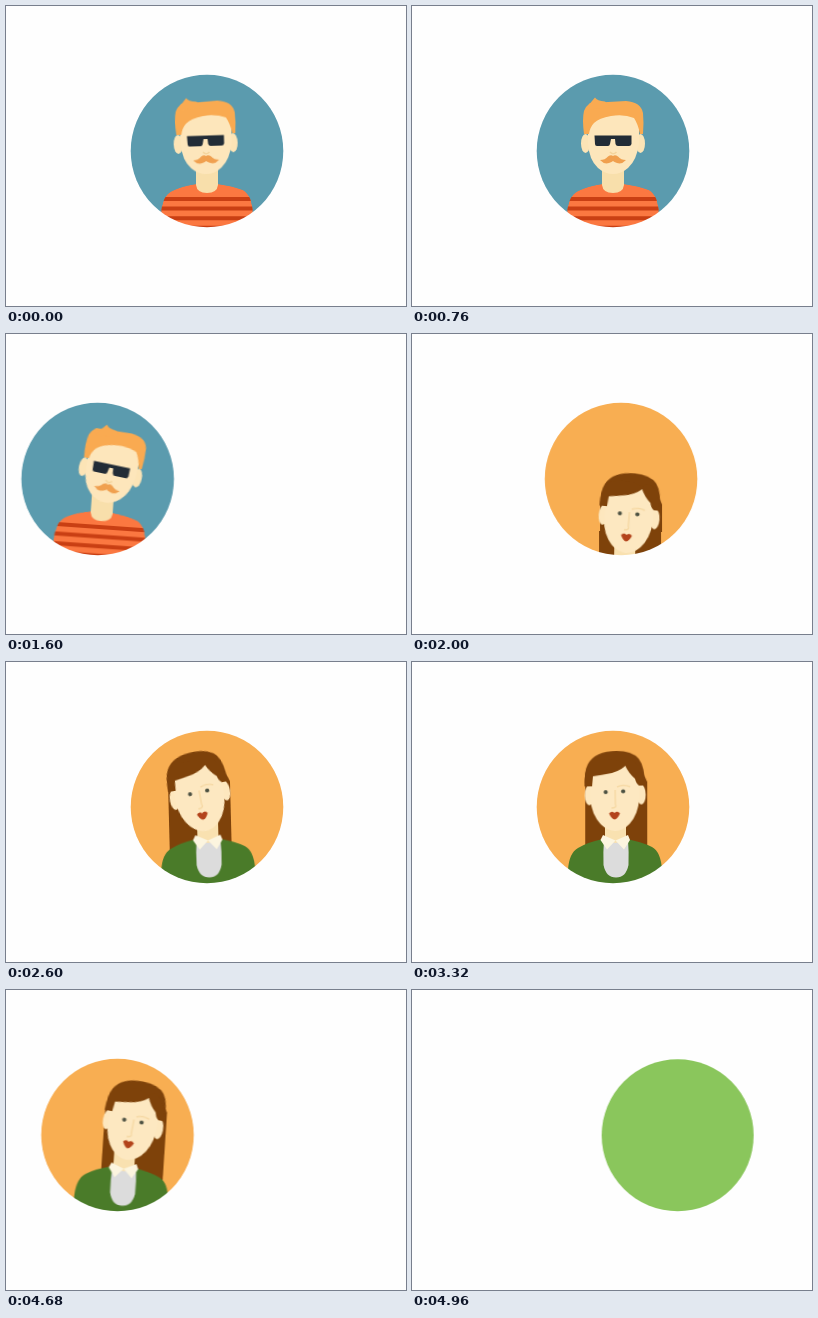
Animation, 400 px wide and 300 px high, one loop 5 s. Source, as an HTML page:

```html
<!DOCTYPE html>
<html lang="en">
<head>
<meta charset="utf-8">
<title>Portrait carousel</title>
<style>
  html, body { margin: 0; width: 100%; height: 100%; overflow: hidden; background: #fefefe; }
  svg { display: block; width: 400px; height: 300px; }
  .disc { clip-path: url(#round); }
  .card, .rise, .body, .head, .locks, .tip { animation: 5s linear infinite; }
  .body { transform-origin: 201px 235px; }
  .head { transform-origin: 202px 180px; }

  #man { animation-name: man-slide; }
  #man .body { animation-name: man-body; }
  #man .head { animation-name: man-head; }
  #man .tip { animation-name: man-tip; }
  #woman { animation-name: woman-slide; }
  #woman .rise { animation-name: woman-rise; }
  #woman .body { animation-name: woman-body; }
  #woman .head { animation-name: woman-head; }
  #woman .locks { animation-name: woman-locks; }
  #next { animation-name: next-slide; }

  /* man: settle, pause, leave to the left with the head trailing */
  @keyframes man-slide {
    0%, 21.6% { transform: translateX(0); animation-timing-function: cubic-bezier(.333, 0, .667, .13); }
    36.8%, 100% { transform: translateX(-288px); }
  }
  @keyframes man-body {
    0%, 21.6% { transform: rotate(0deg); animation-timing-function: cubic-bezier(.5, 0, .75, 1); }
    33%, 100% { transform: rotate(4.2deg); }
  }
  @keyframes man-head {
    0% { transform: rotate(-1.8deg); animation-timing-function: ease-in-out; }
    12%, 21.6% { transform: rotate(0deg); animation-timing-function: cubic-bezier(.5, 0, .75, 1); }
    33%, 100% { transform: rotate(8.2deg); }
  }
  @keyframes man-tip {
    0%, 21.6% { transform: translateX(0); animation-timing-function: cubic-bezier(.5, 0, .75, 1); }
    33%, 100% { transform: translateX(5px); }
  }

  /* woman: slide in, rise, sway, settle, leave */
  @keyframes woman-slide {
    0%, 32.8% { transform: translateX(280px); animation-timing-function: cubic-bezier(.333, 1, .667, 1); }
    43.2%, 84% { transform: translateX(0); animation-timing-function: cubic-bezier(.333, 0, .667, .13); }
    99.2%, 100% { transform: translateX(-288px); }
  }
  @keyframes woman-rise {
    0%, 37.6% { transform: translateY(150px); animation-timing-function: cubic-bezier(.2, .7, .4, 1); }
    46.4%, 100% { transform: translateY(0); }
  }
  @keyframes woman-body {
    0%, 40% { transform: rotate(1deg); animation-timing-function: ease-in-out; }
    52% { transform: rotate(-1.5deg); animation-timing-function: ease-in-out; }
    64%, 84% { transform: rotate(0deg); animation-timing-function: cubic-bezier(.5, 0, .75, 1); }
    95.4%, 100% { transform: rotate(4.2deg); }
  }
  @keyframes woman-head {
    0%, 40% { transform: rotate(4deg); animation-timing-function: ease-in-out; }
    52% { transform: rotate(-9deg); animation-timing-function: ease-in-out; }
    62.4% { transform: rotate(-1.8deg); animation-timing-function: ease-out; }
    74.4%, 84% { transform: rotate(0deg); animation-timing-function: cubic-bezier(.5, 0, .75, 1); }
    95.4%, 100% { transform: rotate(8.2deg); }
  }
  @keyframes woman-locks {
    0%, 40% { transform: translateX(4px); animation-timing-function: ease-in-out; }
    52% { transform: translateX(-9px); animation-timing-function: ease-in-out; }
    62.4% { transform: translateX(-1.5px); animation-timing-function: ease-out; }
    74.4%, 84% { transform: translateX(0); animation-timing-function: cubic-bezier(.5, 0, .75, 1); }
    95.4%, 100% { transform: translateX(8px); }
  }

  /* empty green disc, cut off while still slowing down */
  @keyframes next-slide {
    0%, 95.2% { transform: translateX(280px); animation-timing-function: cubic-bezier(.333, .547, .667, .841); }
    100% { transform: translateX(43.7px); }
  }
</style>
</head>
<body>
<svg viewBox="0 0 400 300">
  <defs>
    <clipPath id="round"><circle cx="201" cy="145" r="76.3"/></clipPath>
    <clipPath id="shirt">
      <path id="torso" d="M152 245L155 208Q156 190 166 185Q176 180 190 178L212 178Q227 180 237 184Q246 189 247 208L250 245Z"/>
    </clipPath>
  </defs>

  <g id="man" class="card">
    <g class="disc">
      <circle cx="201" cy="145" r="77" fill="#5b9bae"/>
      <g class="body">
        <g clip-path="url(#shirt)">
          <use href="#torso" fill="#fb7841"/>
          <path d="M145 193H257M145 202.6H257M145 212.2H257M145 221.8H257" stroke="#c93f13" stroke-width="4"/>
        </g>
        <path d="M190 158H212V179Q211 187 201 187T190 179Z" fill="#f8dfab"/>
        <g class="head">
          <ellipse cx="173.5" cy="137.5" rx="4.5" ry="9.5" fill="#fce4b6"/>
          <ellipse cx="228.5" cy="137.5" rx="4.5" ry="9.5" fill="#fce4b6"/>
          <path d="M176 108H227V137Q225 154 216 162Q209 168 201 168T186 162Q177 154 176 137Z" fill="#fde6bb"/>
          <path d="M172 128Q170 113 172 105Q174 100 178 97L214 95Q229 96 231 107Q232 117 231 128L228 128Q226 118 222 112Q212 108 199 110Q187 112 182 117Q178 121 177 128Z" fill="#f9aa51"/>
          <path class="tip" d="M173 104Q179 96 183 91.5Q185 95 193 95.5L199 101Z" fill="#f9aa51"/>
          <path d="M182.5 129.5H219.5V138Q219 140 217 140H206Q204 140 203.5 138L203 133H199L198 138Q197.5 140 196 140H185Q183 140 183 138Z" fill="#222c36"/>
          <path d="M198 146Q201 149.5 204.5 146" fill="none" stroke="#f4d49c" stroke-width="1.5"/>
          <path d="M188 154Q193 154 196 150.5Q199 148.5 201 150Q203 148.5 206 150.5Q209 154 214 154Q210 158.5 205 157Q202 156 201 155Q200 156 197 157Q192 158.5 188 154Z" fill="#f0a04f"/>
        </g>
      </g>
    </g>
  </g>

  <g id="woman" class="card">
    <g class="disc">
      <circle cx="201" cy="145" r="77" fill="#f8ae52"/>
      <g class="rise">
        <g class="body">
          <path class="locks" d="M174 120Q180 103 205 103Q230 103 236 120V190H174Z" fill="#7e420a"/>
          <path d="M152 245L156 208Q157 191 166 186Q176 180 191 177H215Q230 180 240 185Q249 190 250 208L254 245Z" fill="#4a7b29"/>
          <path d="M193 156H214V180L203.5 190L193 180Z" fill="#f9e1b0"/>
          <path d="M192 178L203.5 181L216 178Q217 190 216.500 203Q214 215.5 204 215.5T191.500 203Q191 190 192 178Z" fill="#dcdcdc"/>
          <path d="M191 173L203.5 178.5L195 187.5L188.5 178ZM216 173L203.5 178.5L212 187.5L218 178Z" fill="#fcf5df"/>
          <g class="head">
            <path d="M174 124Q173 109 177 102Q184 89 206 89Q221 89 228 97Q234 105 234 124Z" fill="#7e420a"/>
            <ellipse cx="178" cy="133" rx="4.5" ry="10" fill="#fde7be"/>
            <ellipse cx="230" cy="133" rx="4.5" ry="10" fill="#fde7be"/>
            <path d="M179 114Q190 103 216 103L228 121V136Q227 152 218 162Q211 169 203.5 169T189 162Q180 152 179 136Z" fill="#fde8c1"/>
            <path d="M173.5 124Q173 106 180 101Q198 93 216 102Q212 108 201 111Q190 113 182 114L181 124ZM214 103Q216 98 222 99Q231 104 233.500 124H228Q225 122 224 117Q218 112 214 103Z" fill="#7e420a"/>
            <path d="M206 125Q212 122 219 125" fill="none" stroke="#f6d9a5" stroke-width="1.5"/>
            <path d="M204 128V142Q206 146 200 146" fill="none" stroke="#f6d9a5" stroke-width="1.5"/>
            <circle cx="194.5" cy="130" r="2.1" fill="#4c5142"/>
            <circle cx="212" cy="129.5" r="2.1" fill="#4c5142"/>
            <path d="M197.500 151.500Q200 148.5 203 151Q206 148.5 208.500 151.500Q206 157 203 157.500Q200 157 197.500 151.500Z" fill="#b3431b"/>
          </g>
        </g>
      </g>
    </g>
  </g>

  <circle id="next" class="card" cx="201" cy="145.3" r="76" fill="#8ac65c"/>
</svg>
</body>
</html>
```
